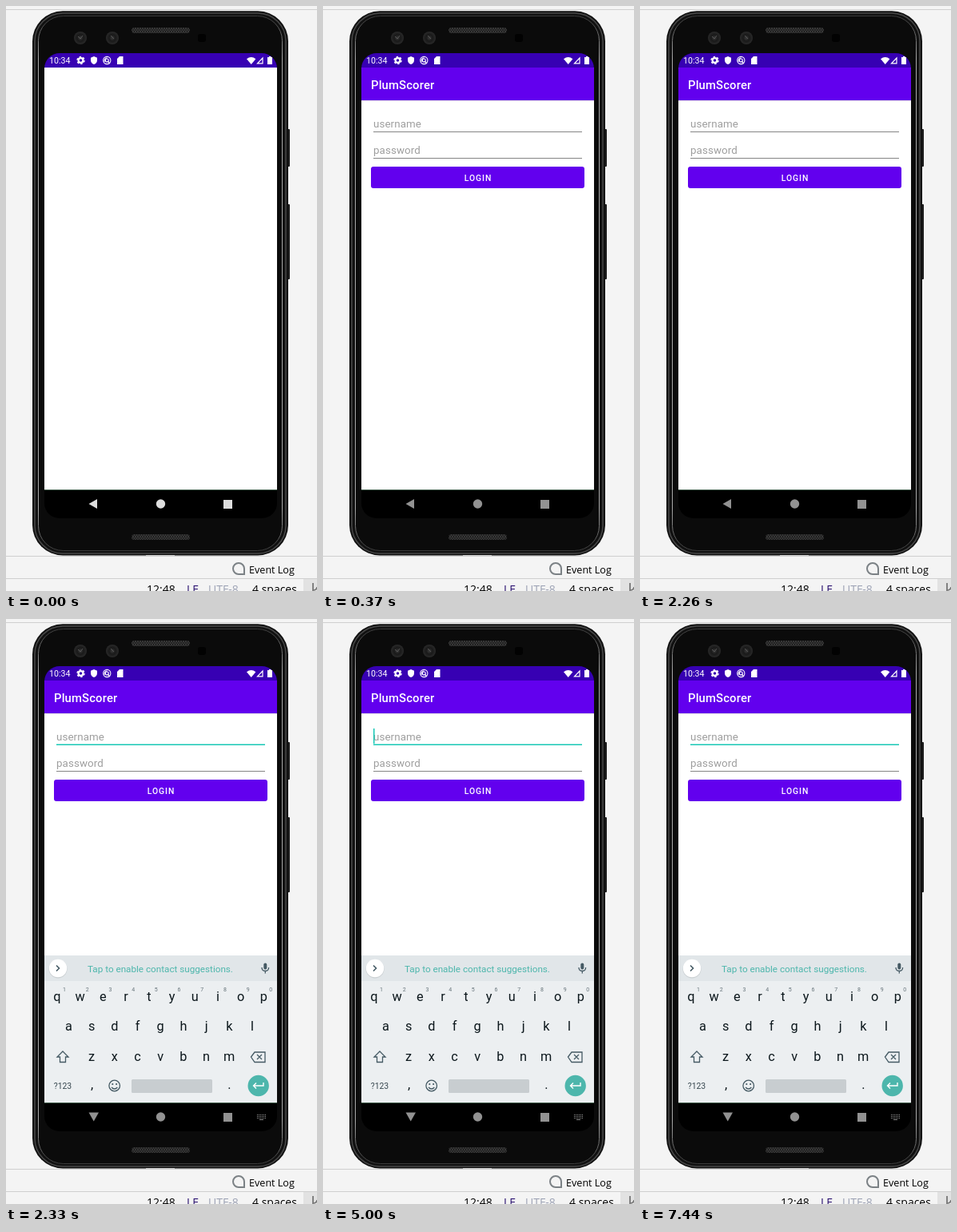
These frames come from a looping animation (389 px wide and 732 px high, 7.99 s). An HTML page:

```html
<!DOCTYPE html>
<html lang="en">
<head>
<meta charset="utf-8">
<style>
html, body { margin: 0; width: 100%; height: 100%; overflow: hidden; background: #f4f4f4; }
svg { display: block; width: 389px; height: 732px; font-family: Roboto, sans-serif; }
.desk { font-family: "Open Sans", "Noto Sans", sans-serif; }
.mid { text-anchor: middle; }
.line { fill: none; stroke: #455a64; stroke-width: 1.3; }
</style>
</head>
<body>
<svg viewBox="0 0 389 732">
  <defs>
    <pattern id="mesh" width="3" height="4" patternUnits="userSpaceOnUse">
      <rect width="3" height="4" fill="#171717"/>
      <path d="M0 0L3 4M3 0L0 4" stroke="#444" stroke-width=".8"/>
    </pattern>
    <linearGradient id="rim" x2="0" y2="1">
      <stop offset="0" stop-color="#3a3a3a"/>
      <stop offset=".08" stop-color="#a8a8a8"/>
      <stop offset=".92" stop-color="#a8a8a8"/>
      <stop offset="1" stop-color="#3a3a3a"/>
    </linearGradient>
    <radialGradient id="lens">
      <stop offset="0" stop-color="#3a3a3a"/>
      <stop offset=".5" stop-color="#191919"/>
      <stop offset="1" stop-color="#2a2a2a"/>
    </radialGradient>
    <clipPath id="display"><rect x="48" y="59" width="291" height="582" rx="19"/></clipPath>
  </defs>

  <!-- desktop window -->
  <path d="M0 4.5H389M0 688.5H389M0 716.5H389" stroke="#cfcfcf"/>
  <rect x="372" y="717" width="17" height="15" fill="#e2e2e2"/>
  <path d="M384 722V732M384 731q5 0 5-4" fill="none" stroke="#777" stroke-width="1.8"/>
  <path d="M298 711H291A7 7 0 1 1 298 704Z" fill="none" stroke="#7b8185" stroke-width="2"/>
  <g class="desk" fill="#000">
    <text x="304" y="710" font-size="12.6">Event Log</text>
    <g font-size="14">
      <text x="176" y="735">12:48</text>
      <text x="226" y="735" fill="#29106f">LF</text>
      <text x="253" y="735" fill="#9da3b5">UTF-8</text>
      <text x="308" y="735">4 spaces</text>
    </g>
  </g>

  <!-- phone body -->
  <path d="M351 154h3q1 0 1 1v45q0 1-1 1h-3zM351 248h3q1 0 1 1v92q0 1-1 1h-3z" fill="#1d1d1d"/>
  <rect x="33" y="6.3" width="320" height="681.2" rx="38" fill="#111"/>
  <rect x="36" y="9" width="314" height="676" rx="35" fill="none" stroke="#484848" stroke-width="1.5"/>
  <rect x="40.5" y="12.500" width="305" height="669" rx="31" fill="#0b0b0b" stroke="url(#rim)"/>
  <path d="M175 687.5H211" stroke="#d4d4d4"/>
  <rect x="157" y="27" width="73" height="7" rx="3.5" fill="url(#mesh)"/>
  <rect x="157" y="661" width="73" height="7" rx="3.5" fill="url(#mesh)"/>
  <circle cx="93" cy="40" r="8" fill="url(#lens)"/>
  <circle cx="133" cy="40" r="8" fill="url(#lens)"/>
  <path d="M90 38l3 3 3-4M131 37l4 4" fill="none" stroke="#555"/>
  <rect x="240" y="35" width="10" height="10" rx="3" fill="#020202"/>

  <g clip-path="url(#display)">
    <rect x="48" y="59" width="291" height="582" fill="#000"/>
    <rect x="48" y="77" width="291" height="528" fill="#fff"/>
    <rect x="48" y="59" width="291" height="18" fill="#3700b3"/>
    <path d="M48 605.5H339" stroke="#45604f"/>

    <!-- status bar -->
    <g fill="#fff">
      <text x="54" y="72" font-size="10.6">10:34</text>
      <circle cx="93.5" cy="68" r="2.9" fill="none" stroke="#fff" stroke-width="2.2"/>
      <circle cx="93.5" cy="68" r="4.5" fill="none" stroke="#fff" stroke-width="1.4" stroke-dasharray="2.4 2.312"/>
      <path d="M110 63l4 1.7v3q0 3.8-4 5.3-4-1.5-4-5.3v-3z"/>
      <g fill="none" stroke="#fff" stroke-width="1.1">
        <circle cx="126.3" cy="68" r="4.6"/>
        <circle cx="126.3" cy="68" r="2"/>
        <path d="M123 70q0-5 3.5-5M127 69l3 3"/>
      </g>
      <path d="M142 63h4.5v10h-7.5v-7z"/>
      <path d="M301 66.3q5.7-4.6 11.4 0L306.7 73z"/>
      <path d="M314.500 71.800H321V65z" fill="none" stroke="#fff" stroke-width="1.2"/>
      <path d="M329 63h2.5v1h1.5v9h-6v-9h2z"/>
    </g>

    <!-- login form -->
    <g id="form">
      <path d="M48 118.5H339" stroke="#e4e4e4"/>
      <rect x="48" y="77" width="291" height="41" fill="#6200ee"/>
      <text x="60" y="104" font-size="14.8" font-weight="500" letter-spacing=".18" fill="#fff">PlumScorer</text>
      <g font-size="13.33" letter-spacing=".1" fill="#9e9e9e">
        <text x="63" y="152">username</text>
        <text x="63" y="185">password</text>
      </g>
      <path id="field"/>
      <path d="M63 190.5H324" stroke="#858585"/>
      <rect x="60" y="201" width="267" height="27" rx="3" fill="#6200ee"/>
      <text x="194" y="219" class="mid" font-size="10.37" font-weight="500" letter-spacing=".93" fill="#fff">LOGIN</text>
      <rect id="caret" x="63" y="137" width="1.5" height="19" fill="#18c8b5"/>
    </g>

    <!-- navigation bar -->
    <g id="nav">
      <path id="back"/>
      <circle cx="193.5" cy="623" r="5.7"/>
      <rect x="272" y="618" width="11" height="11"/>
    </g>

    <g id="keyboard">
      <rect x="48" y="421" width="291" height="184" fill="#eceff1"/>
      <rect x="48" y="421" width="291" height="32" fill="#e1e6e9"/>
      <circle cx="65" cy="437.8" r="11.6" fill="#cbd0d3"/>
      <circle cx="65" cy="437" r="11.2" fill="#fff"/>
      <path d="M63 433.5l3.5 3.5-3.5 3.5" class="line" style="stroke-width:1.6"/>
      <text x="193" y="441.5" class="mid" font-size="11.7" fill="#4db6ac">Tap to enable contact suggestions.</text>
      <rect x="322.3" y="430.5" width="4" height="8" rx="2" fill="#455a64"/>
      <path d="M320 436q0 4.5 4.3 4.5t4.3-4.5M324.3 440.5v3" class="line"/>
      <g id="keys" class="mid" font-size="16.3" fill="#0c171c"></g>
      <g class="line">
        <path d="M71 541l7 7h-3.5v6.5h-7v-6.5H64z"/>
        <path d="M306.5 548l4.5-6h13v12.5h-13zM314 545l6 6M320 545l-6 6"/>
        <circle cx="135.7" cy="584" r="6.8"/>
        <path d="M132 586q3.7 4 7.4 0"/>
      </g>
      <circle cx="133.3" cy="582" r="1.1" fill="#455a64"/>
      <circle cx="138.1" cy="582" r="1.1" fill="#455a64"/>
      <text x="71" y="588" class="mid" font-size="10.4" fill="#37474f">?123</text>
      <rect x="157" y="576" width="101" height="17" rx="1.5" fill="#c8cdd0"/>
      <circle cx="315.7" cy="584" r="13.2" fill="#4db6ac"/>
      <path d="M322 580v4h-12.5M313 580.5l-3.5 3.5 3.5 3.5" fill="none" stroke="#fff" stroke-width="1.4"/>
      <path d="M314 620.5H325M314 622.5H325M314 624.5H325" stroke="#a0a0a0" stroke-dasharray="1 1"/>
      <path d="M317 626.5H322" stroke="#888"/>
    </g>
  </g>
</svg>
<script>
const LOOP = 7990, PITCH = 28.7;
const BLINKS = [3450, 3520, 4200, 4470, 5000, 5460, 5990, 6450, 6980, 7440];
const get = id => document.getElementById(id);
const show = (id, on) => get(id).setAttribute('visibility', on ? 'visible' : 'hidden');
const set = (id, attrs) => {
  for (const name in attrs) get(id).setAttribute(name, attrs[name]);
};

function keyRow(chars, x, y, style = '') {
  return [...chars].map((c, i) =>
    `<text x="${x + i * PITCH}" y="${y}" ${style}>${c}</text>`).join('');
}

get('keys').innerHTML =
  keyRow('qwertyuiop', 64, 478) +
  keyRow('1234567890', 73, 466, 'font-size="7" fill="#66737a"') +
  keyRow('asdfghjkl', 78.4, 515) +
  keyRow('zxcvbnm', 107, 552.5) +
  keyRow(',', 107.5, 588) +
  keyRow('.', 279.3, 588);

function draw(t) {
  const typing = t >= 2330;
  show('form', t >= 370);
  show('keyboard', typing);
  // Each listed time toggles the caret, beginning with it hidden.
  show('caret', BLINKS.filter(b => b <= t).length % 2);
  set('nav', { fill: t < 170 ? '#dedede' : '#929292' });
  set('back', { d: typing ? 'M103.5 617.5h12.5l-6.25 11z' : 'M114 617v12l-10.5-6z' });
  set('field', typing
    ? { d: 'M63 157.25H324', stroke: '#18c8b5', 'stroke-width': 1.5 }
    : { d: 'M63 157.5H324', stroke: '#858585', 'stroke-width': 1 });
}

function tick() {
  draw(performance.now() % LOOP);
  requestAnimationFrame(tick);
}
tick();
</script>
</body>
</html>
```
